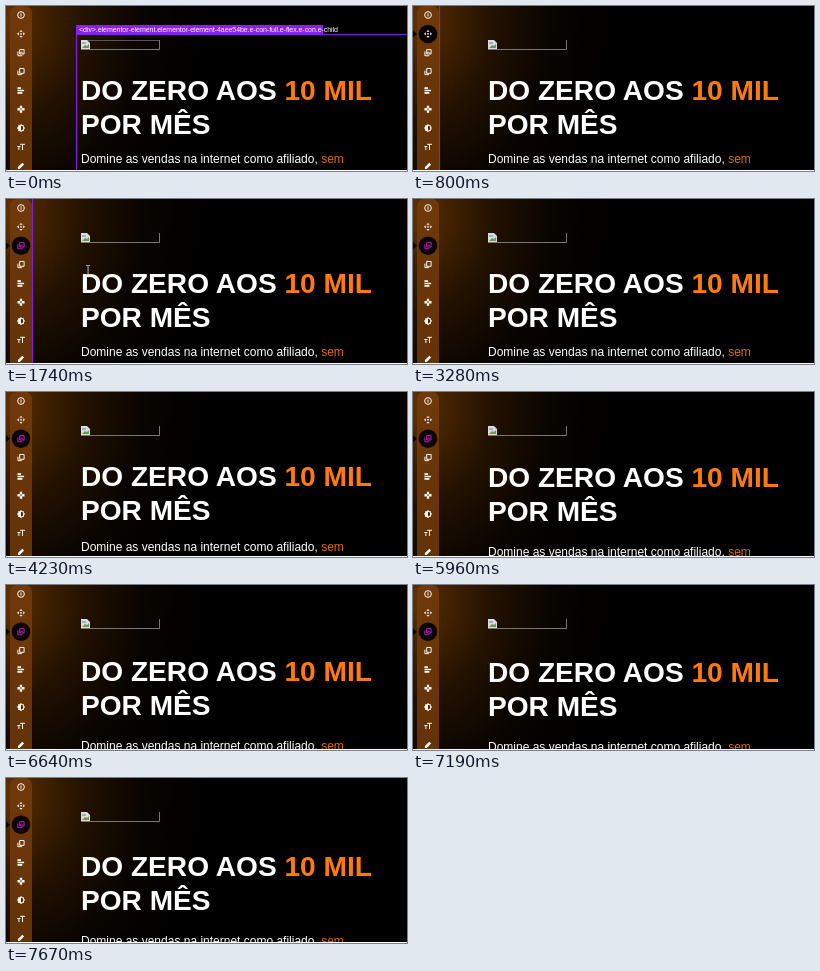
These frames come from a looping animation (401 by 165 pixels, 8000 ms). An HTML page:

```html
<!DOCTYPE html>
<html lang="pt">
<head>
<meta charset="utf-8">
<style>
html, body { margin: 0; width: 401px; height: 165px; overflow: hidden; background: #000; }
svg { display: block; }
text { font-family: "Liberation Sans", Arial, sans-serif; fill: #fff; white-space: pre; }
.head { font-size: 28.1px; font-weight: bold; }
.sub { font-size: 12px; }
.head tspan { fill: #ff7a0c; }
.sub tspan { fill: #dc6a12; }
.tag { font-size: 7px; letter-spacing: -.05px; }
.icon { fill: none; stroke: #fff; stroke-width: 1.1; }
.icon .fill { fill: #fff; stroke: none; }
.icon .dark { fill: #4a2505; stroke: none; }
</style>
</head>
<body>
<svg width="401" height="165" viewBox="0 0 401 165">
  <defs>
    <radialGradient id="light" gradientUnits="userSpaceOnUse" cx="0" cy="15" r="200" gradientTransform="translate(0 -4) scale(1 1.25)">
      <stop offset="0" stop-color="#623200"/>
      <stop offset=".15" stop-color="#472400"/>
      <stop offset=".4" stop-color="#221100"/>
      <stop offset=".7" stop-color="#080400"/>
      <stop offset="1" stop-color="#000"/>
    </radialGradient>
    <linearGradient id="bar" x2="0" y2="1">
      <stop offset="0" stop-color="#70390a"/>
      <stop offset="1" stop-color="#633207"/>
    </linearGradient>
  </defs>

  <rect width="401" height="165" fill="url(#light)"/>

  <!-- missing image -->
  <path d="M84 43.5H153.5V34" fill="none" stroke="#777"/>
  <path id="imageTop" d="M75 34.5H153" stroke="#555"/>
  <path d="M75 34h6l3 3v6.5h-9z" fill="#ddd"/>
  <path d="M76 42l3-3 2 1 2-2v4z" fill="#6b9a55"/>
  <path d="M76 36h4v2h-4z" fill="#8db4dc"/>

  <g id="title">
    <text class="head" x="75" y="94">DO ZERO AOS <tspan>10 MIL</tspan></text>
    <text class="head" x="75" y="128">POR MÊS</text>
  </g>
  <text id="lead" class="sub" x="75" y="157">Domine as vendas na internet como afiliado, <tspan>sem</tspan></text>

  <g id="outline">
    <path d="M401 28.5H70.5V165" fill="none" stroke="#7f1fe0" stroke-width="1.2"/>
    <rect x="70" y="19" width="247" height="9.5" fill="#8a20f0"/>
    <text class="tag" x="73" y="26">&lt;div&gt;.elementor-element.elementor-element-4aee54be.e-con-full.e-flex.e-con.e-child</text>
  </g>
  <path id="edge" d="M26.5 0V165" stroke="#7f1fe0" stroke-width="1.2"/>

  <rect x="4" y="0" width="22" height="180" rx="7" fill="url(#bar)"/>
  <g id="hover" fill="#0b0508">
    <circle cx="15" r="9.3"/>
    <path d="M0-3.5L4 0 0 3.5z"/>
  </g>
  <g id="tools"></g>

  <path id="cursor" d="M-2-4.5H-.5L0-4 .5-4.5H2M0-4V4M-2 4.5H-.5L0 4 .5 4.5H2" fill="none" stroke="#ccc" stroke-width=".9"/>
  <path d="M0 164.5H401" stroke="#fff"/>
</svg>
<script>
const $ = id => document.getElementById(id);
const LOOP = 8000;

const icons = [
  '<circle r="3.8"/><path d="M0-1.8V1.8"/>',
  '<circle class="fill" r="1"/><path class="fill" d="M0-4.5l1.8 2h-3.6zM0 4.5l1.8-2h-3.6zM-4.5 0l2-1.8v3.6zM4.5 0l-2-1.8v3.6z"/>',
  '<path d="M-1.5-3.5h5v5h-5zM-3.5-1.5v5h5M-1 1l1.5-2 2 2"/>',
  '<path d="M-1.5-3.5h5v5.5h-5zM-3.5-1v4.5h4.5"/>',
  '<path class="fill" d="M-4-3.5h4v2h-4zM-4-.8h7.5v1.8h-7.5zM-4 1.8h5.5v2h-5.5z"/>',
  '<path class="fill" d="M-1.3-4h2.6v2.5L0-.5l-1.3-1zM-1.3 4h2.6V1.5L0 .5l-1.3 1zM-4-1.3v2.6h2.5L-.5 0l-1-1.3zM4-1.3v2.6H1.5L.5 0l1-1.3z"/>',
  '<path class="fill" d="M-3.2-3.2h6.4v6.4h-6.4zM0-4.6L4.6 0 0 4.6-4.6 0z"/><path class="dark" d="M0-2.6a2.6 2.6 0 0 1 0 5.2z"/>',
  '<path d="M-1-3h5.5M1.7-3v6.5M-4.2-.5h3.6M-2.4-.5v4"/>',
  '<path class="fill" d="M-3.5 3.5v-2l5-5 2 2-5 5z"/>'
];
$('tools').innerHTML = icons.map((art, i) =>
  `<g class="icon" transform="translate(15 ${9 + i * 18.85}) scale(.88)">${art}</g>`).join('');
const activeTool = $('tools').children[2];

// Linear interpolation over [time, value] pairs.
function track(t, keys) {
  if (t <= keys[0][0]) return keys[0][1];
  for (let i = 1; i < keys.length; i++) {
    const [a, from] = keys[i - 1], [b, to] = keys[i];
    if (t < b) return from + (to - from) * (t - a) / (b - a);
  }
  return keys[keys.length - 1][1];
}

const show = (id, on) => $(id).setAttribute('visibility', on ? 'visible' : 'hidden');
const move = (id, x, y) => $(id).setAttribute('transform', `translate(${x} ${y})`);

function draw(t) {
  show('outline', t < 330);
  show('imageTop', t < 400);
  show('edge', t >= 400 && t < 2200);

  show('hover', t >= 660);
  move('hover', 0, t < 930 ? 28 : 46.7);
  $('hover').setAttribute('opacity', track(t, [[660, .3], [800, 1]]));
  activeTool.style.stroke = t >= 1000 ? '#c022c0' : '#fff';

  show('cursor', t >= 1600 && t < 2330);
  move('cursor', track(t, [[1600, 50], [1740, 82], [2200, 109]]),
    track(t, [[1600, 62], [1740, 71], [2200, 77]]));

  move('title', 0, Math.round(track(t, [[5290, 0], [6030, 1], [6640, 2], [7460, 4]])));
  move('lead', 0, Math.round(track(t, [[3810, 0], [4290, 2], [4430, 2], [4950, 4], [5960, 7], [6640, 8], [7460, 10]])));
}

function tick() {
  draw(performance.now() % LOOP);
  requestAnimationFrame(tick);
}
tick();
</script>
</body>
</html>
```
